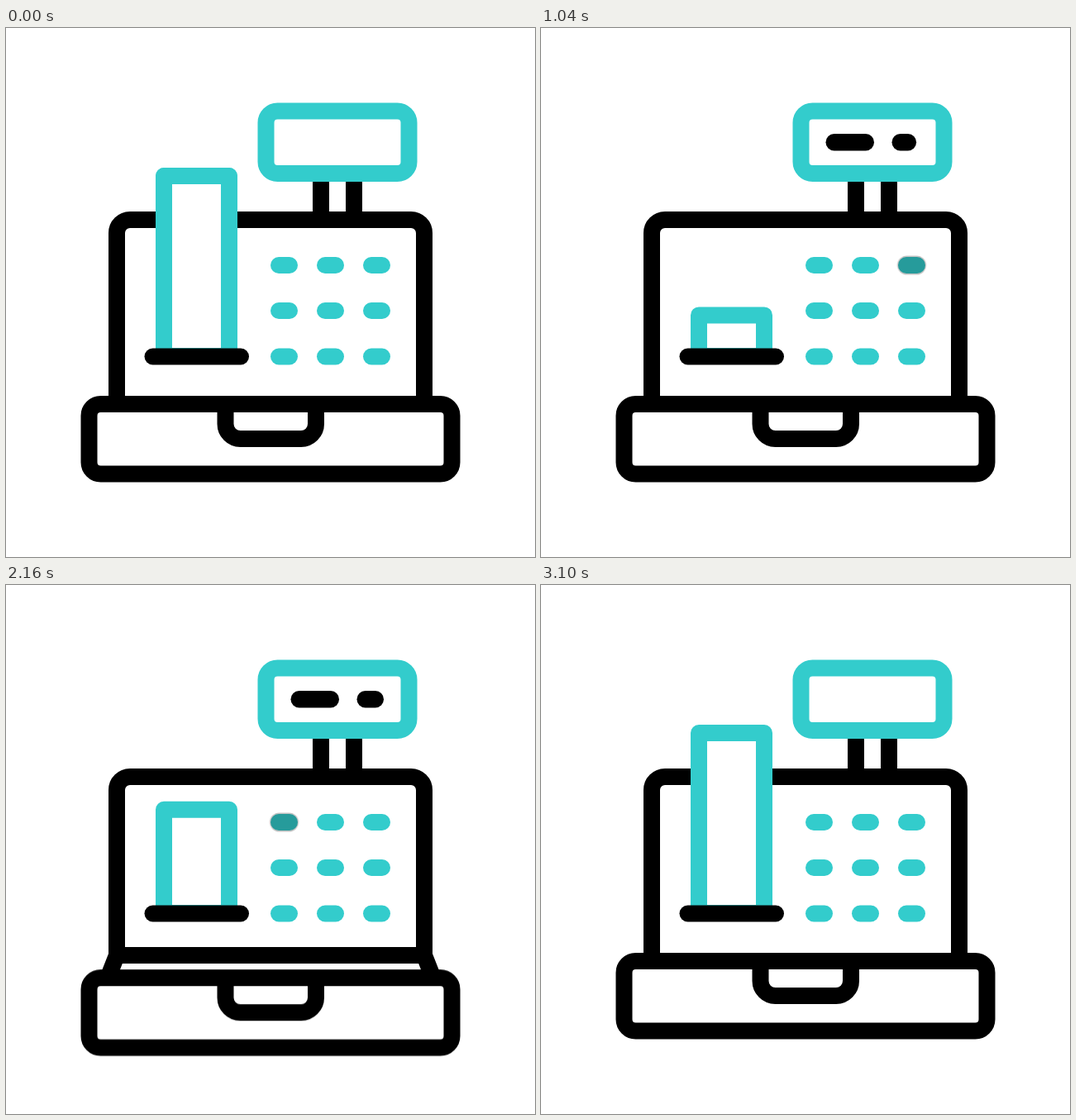
Write an HTML page without scripts that moves like this. It is 640 by 640 pixels and loops after 3600 ms.

```html
<!DOCTYPE html>
<html lang="en">
<head>
<meta charset="utf-8">
<title>Cash register</title>
<style>
html, body { margin: 0; width: 100%; height: 100%; overflow: hidden; background: #fff; }
svg { display: block; width: 100%; height: 100%; }
.line { fill: none; stroke: #000; stroke-width: 20; stroke-linejoin: round; }
.cyan { stroke: #3cc; }
.white { fill: #fff; }
.move { animation: 3600ms linear infinite; }

/* receipt: pulled up and over the back, then a new one is printed */
.paper { animation-name: paper; }
@keyframes paper {
  0%, 1.67% { d: path("M191 397C191 330 191 250 191 179L270 179C270 250 270 330 270 397Z"); }
  11.667% { d: path("M174.5 183C174.5 158 183 136 191.500 126L270 126C279 136 288.500 160 288.500 183Z"); }
  13.88% { d: path("M187 128C188 127 189 126 191 126L270 126C272 126 273 127 274 128Z"); }
  13.9%, 15.56% { d: path("M191 397C191 397 191 397 191 397L270 397C270 397 270 397 270 397Z"); }
  28.89% { d: path("M191 397C191 380 191 364 191 347.500L270 347.500C270 364 270 380 270 397Z"); }
  42.78% { d: path("M191 397C191 367 191 337 191 307.500L270 307.500C270 337 270 367 270 397Z"); }
  60% { d: path("M191 397C191 355 191 314 191 272L270 272C270 314 270 355 270 397Z"); }
  72.78% { d: path("M191 397C191 335 191 274 191 212L270 212C270 274 270 335 270 397Z"); }
  85.56%, 100% { d: path("M191 397C191 330 191 250 191 179L270 179C270 250 270 330 270 397Z"); }
}
.rear { animation-name: rear; }
@keyframes rear {
  0%, 1.67% { transform: translateY(53px); }
  11.667%, 13.88% { transform: none; animation-timing-function: ease-in; }
  16.9%, 100% { transform: translateY(130px); }
}

.drawer { animation-name: drawer; }
@keyframes drawer {
  0%, 49.44% { transform: none; animation-timing-function: ease-in-out; }
  71.67%, 72.22% { transform: translateY(44px); animation-timing-function: ease-in-out; }
  85.56%, 100% { transform: none; }
}
.base { animation-name: base; }
@keyframes base {
  0%, 49.44% { transform: translateY(7px); }
  52.78%, 82.78% { transform: none; }
  85.2%, 100% { transform: translateY(7px); }
}

/* display bars */
.long { animation-name: long; }
@keyframes long {
  0%, 19% { width: 0; }
  25%, 75% { width: 58.5px; }
  80%, 100% { width: 0; }
}
.short { animation-name: short; }
@keyframes short {
  0%, 25% { width: 0; }
  28.89% { width: 29.5px; }
  29.6%, 73.4% { width: 32.5px; }
  76%, 100% { width: 0; }
}

/* key presses, one every 560 ms */
.press { opacity: 0; animation-name: press; animation-delay: var(--at); }
@keyframes press {
  0% { opacity: 0; }
  2.5%, 5.3% { opacity: 1; }
  7.5%, 100% { opacity: 0; }
}
</style>
</head>
<body>
<svg viewBox="0 0 640 640">
  <defs>
    <clipPath id="above"><rect width="640" height="232"/></clipPath>
    <rect id="key" x="-16.5" y="-10" width="33" height="20" rx="10"/>
    <g id="row" fill="#3cc">
      <use href="#key" x="336.500"/>
      <use href="#key" x="392.500"/>
      <use href="#key" x="448.500"/>
    </g>
    <rect id="down" x="-17.5" y="-11.500" width="35" height="23" rx="11.500"/>
  </defs>

  <g clip-path="url(#above)">
    <path class="line cyan white move rear" d="M191 320V126H270V320"/>
  </g>

  <path class="line" d="M381 180V230M421 180V230"/>
  <rect class="line cyan white" x="314.500" y="100.500" width="173" height="75.500" rx="14"/>
  <rect class="move long" x="344.500" y="128" width="0" height="20.500" rx="10.250"/>
  <rect class="move short" x="424.500" y="128" width="0" height="20.500" rx="10.250"/>

  <path class="line" d="M134 450V248a16 16 0 0 1 16-16H490a16 16 0 0 1 16 16V450"/>
  <path class="line move base" d="M112 504L134 448H506L528 504" style="stroke-linejoin:round"/>

  <use href="#row" y="287"/>
  <use href="#row" y="342"/>
  <use href="#row" y="397.500"/>
  <use class="move press" href="#down" x="448.500" y="287" style="--at:790ms"/>
  <use class="move press" href="#down" x="392.500" y="397.500" style="--at:1350ms"/>
  <use class="move press" href="#down" x="336.500" y="287" style="--at:1910ms"/>

  <path class="line cyan white move paper" d="M191 397C191 330 191 250 191 179L270 179C270 250 270 330 270 397Z"/>
  <path class="line" d="M177.500 397.500H284" stroke-linecap="round"/>

  <g class="move drawer">
    <rect class="line white" x="100.500" y="455" width="439" height="84.500" rx="14"/>
    <path class="line" d="M265.500 455V479a18 18 0 0 0 18 18H357a18 18 0 0 0 18-18V455"/>
  </g>
</svg>
</body>
</html>
```
